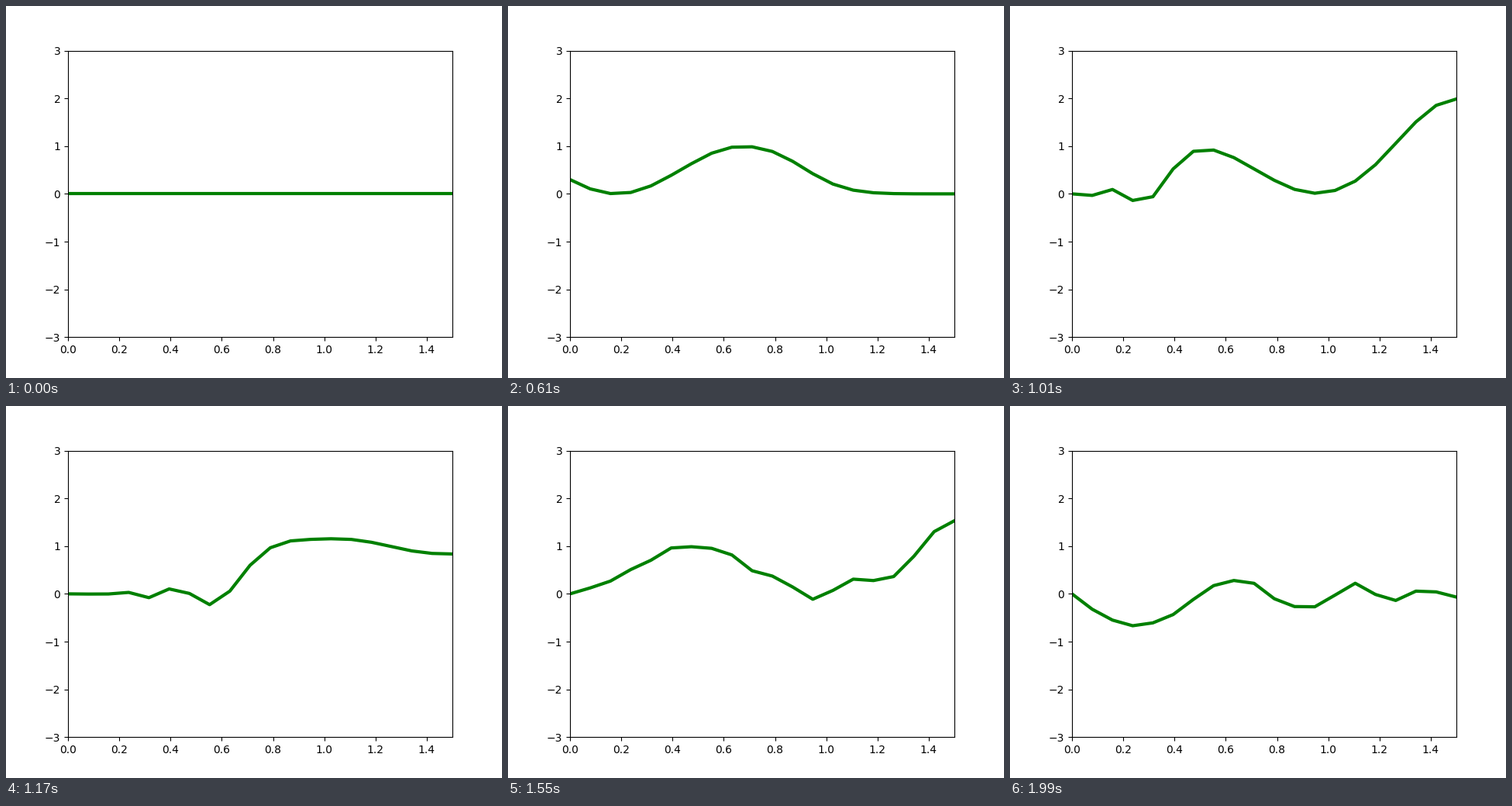
A matplotlib script for the animation above (2.01 s loop, 640 by 480 pixels).

```python
import numpy as np
import matplotlib.pyplot as plt
from matplotlib.animation import FuncAnimation

LENGTH = 1.5
NODES = 20
STEPS = 100
COURANT = 0.5
LAST_DRIVEN = 39  # the left end is held at zero after this step

TICK = 10  # ms
LOOP = 2010  # ms

x = np.linspace(0, LENGTH, NODES)
dt = COURANT * (x[1] - x[0])


def drive(n):
    return np.sin(np.pi * n * dt) ** 2 if n <= LAST_DRIVEN else 0.0


def solve():
    """Explicit wave equation: driven left end, free right end."""
    u = np.zeros((STEPS, NODES))
    for n in range(1, STEPS - 1):
        now = np.append(u[n], u[n, -2])  # mirrored ghost node
        bend = now[2:] - 2 * now[1:-1] + now[:-2]
        u[n + 1, 1:] = 2 * u[n, 1:] - u[n - 1, 1:] + COURANT**2 * bend
        u[n + 1, 0] = drive(n + 1)
    return u


wave = solve()

fig, ax = plt.subplots(figsize=(6.4, 4.8), dpi=100)
ax.set_xlim(0, LENGTH)
ax.set_ylim(-3, 3)
line, = ax.plot(x, wave[0], color="green", lw=3)


def update(i):
    # Rest for 50 ms, then one step every 20 ms
    step = max(0, (i * TICK - 10) // 20)
    line.set_ydata(wave[min(step, STEPS - 1)])
    return line,


anim = FuncAnimation(fig, update, frames=LOOP // TICK, interval=TICK,
                     repeat=True, repeat_delay=0, blit=False)

plt.show()
```
